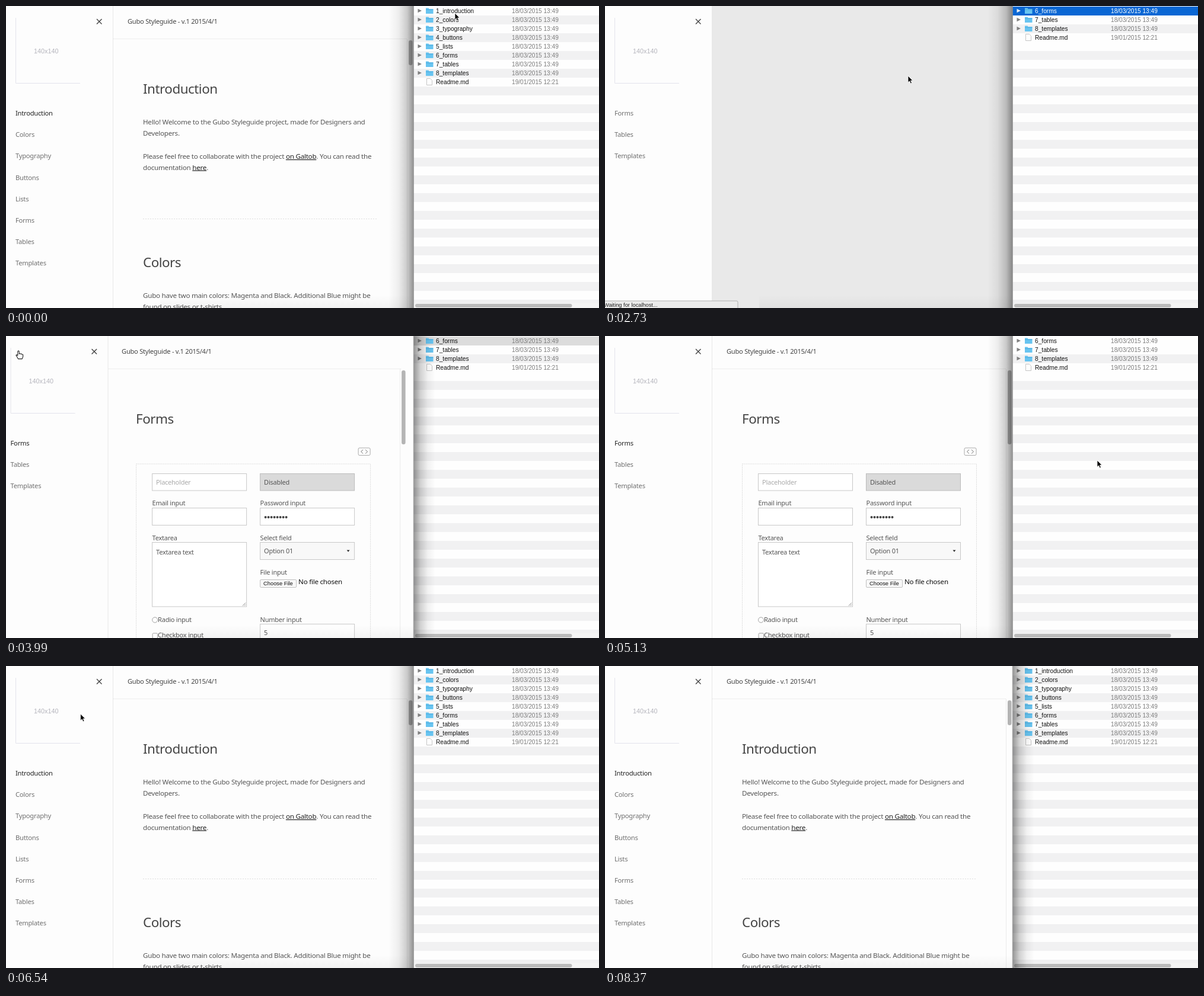
Recreate the animation shown at these times as an HTML page. Size 1000x510 px, loop 8.4 s.

```html
<!DOCTYPE html>
<html lang="en">
<head>
<meta charset="utf-8">
<title>Styleguide preview</title>
<style>
html, body { margin: 0; width: 100%; height: 100%; overflow: hidden; background: #fdfdfd; }
svg { display: block; width: 100vw; height: 100vh; }
text { font-family: "Noto Sans", sans-serif; letter-spacing: -.022em; white-space: pre; }
.ui { font-family: "Liberation Sans", Arial, sans-serif; letter-spacing: 0; }
.link { text-decoration: underline; fill: #222; }
</style>
</head>
<body>
<svg viewBox="0 0 1000 510" preserveAspectRatio="none">
  <defs>
    <linearGradient id="shadeL">
      <stop offset="0" stop-opacity="0"/>
      <stop offset=".4" stop-opacity=".06"/>
      <stop offset=".75" stop-opacity=".2"/>
      <stop offset="1" stop-opacity=".42"/>
    </linearGradient>
    <linearGradient id="shadeR">
      <stop offset="0" stop-opacity=".4"/>
      <stop offset=".3" stop-opacity=".18"/>
      <stop offset=".65" stop-opacity=".05"/>
      <stop offset="1" stop-opacity="0"/>
    </linearGradient>
    <linearGradient id="shadeB" x2="0" y2="1">
      <stop offset="0" stop-opacity="0"/>
      <stop offset="1" stop-opacity=".04"/>
    </linearGradient>
    <clipPath id="left"><rect width="687" height="510"/></clipPath>
  </defs>
  <g clip-path="url(#left)">
    <rect width="687" height="510" fill="#fdfdfd"/>
    <g id="main"><g id="intro"></g><g id="forms"></g></g>
    <g id="bar"></g>
    <rect id="blank" width="687" height="510" fill="#e9e9e9"/>
    <g id="head"></g>
    <g id="rawHead"></g>
    <g id="side"></g>
    <g id="burger">
      <rect width="42" height="37" fill="#fdfdfd"/>
      <path d="M12 14.5h12M12 18.5h12M12 22.5h12" stroke="#777"/>
    </g>
    <rect x="260" y="488" width="427" height="22" fill="url(#shadeB)"/>
    <rect id="shadowL" x="645" width="42" height="510" fill="url(#shadeL)"/>
    <g id="wait"></g>
  </g>
  <g id="finder"></g>
  <rect id="shadowR" x="688" width="36" height="510" fill="url(#shadeR)"/>
  <path d="M687.3 0v510" stroke="#909090"/>
  <g id="cursor">
    <path id="arrow" d="M0 0V11.2L2.6 8.8 4.4 13 6.4 12.1 4.6 8H8Z" fill="#000" stroke="#fff" stroke-width=".8"/>
    <path id="hand" d="M-1.2 1Q0-.8 1.2 1V5.2L2 4.6 3.4 5.2 4.8 5 6 6 7.6 6.4V10L6.2 13.6H-.6L-2.2 10.5-4 7.6Q-3.6 6-1.2 8Z" fill="#fff" stroke="#222" stroke-width="1.1" stroke-linejoin="round"/>
  </g>
</svg>
<script>
const LOOP = 8400;
const $ = id => document.getElementById(id);
const show = (id, on) => { $(id).style.display = on ? '' : 'none'; };
const move = (id, x, y = 0) => $(id).setAttribute('transform', `translate(${x} ${y})`);

const text = (x, y, s, size, fill, cls = '') =>
  `<text x="${x}" y="${y}" font-size="${size}" fill="${fill}" class="${cls}">${s}</text>`;
const rect = (x, y, w, h, fill, more = '') =>
  `<rect x="${x}" y="${y}" width="${w}" height="${h}" fill="${fill}" ${more}/>`;
const path = (d, stroke, more = '') => `<path d="${d}" fill="none" stroke="${stroke}" ${more}/>`;

const PAGE = '#fdfdfd', INK = '#555', TITLE = '#444', DARK = '#222';
const HEADER = 'Gubo Styleguide - v.1 2015/4/1';
const title = (x, y, s) => text(x, y, s, 22.4, TITLE);
const para = (y, s) => text(231, y, s, 11.65, INK);
const link = s => `<tspan class="link">${s}</tspan>`;

$('intro').innerHTML =
  title(231, 148, 'Introduction') +
  para(200, 'Hello! Welcome to the Gubo Styleguide project, made for Designers and') +
  para(219, 'Developers.') +
  para(258, `Please feel free to collaborate with the project ${link('on Galtob')}. You can read the`) +
  para(276.5, `documentation ${link('here')}.`) +
  path('M231 359.5H626', '#ddd', 'stroke-dasharray="2 2"') +
  title(231, 441, 'Colors') +
  para(493, 'Gubo have two main colors: Magenta and Black. Additional Blue might be') +
  para(511.5, 'found on slides or t-shirts.');

function formPage() {
  const A = 246.5, B = 428.5;
  const label = (x, y, s) => text(x, y, s, 11, INK);
  const field = (x, y, h, fill = '#fff', line = '#c8c8c8') =>
    rect(x, y, 159, h, fill, `stroke="${line}"`);
  const value = (x, y, s, fill = INK) => text(x + 6.5, y, s, 11, fill);
  let dots = '';
  for (let i = 0; i < 8; i++) dots += `<circle cx="${437.5 + i * 5}" cy="306" r="2" fill="${TITLE}"/>`;
  return title(219, 148, 'Forms') +
    rect(594, 189, 20, 12.5, 'none', 'rx="2" stroke="#aaa"') +
    path('M602 192l-3.5 3.3 3.5 3.3M606 192l3.5 3.3-3.5 3.3', '#777') +
    rect(219.5, 216, 395, 330, 'none', 'stroke="#ddd" stroke-dasharray="2 1"') +
    field(A, 232.5, 28.5) + value(A, 251, 'Placeholder', '#aaa') +
    field(B, 232.5, 28.5, '#dadada', '#bbb') + value(B, 251, 'Disabled') +
    label(A, 286, 'Email input') + field(A, 290.5, 29) +
    label(B, 286, 'Password input') + field(B, 290.5, 29) + dots +
    label(A, 345, 'Textarea') + field(A, 348.5, 108.5) + value(A, 369, 'Textarea text') +
    path('M399 455.5l5-5M402 455.5l2-2', '#888') +
    label(B, 345, 'Select field') + field(B, 348.5, 29, '#f8f8f8') + value(B, 367, 'Option 01') +
    '<path d="M574.5 361.5h5l-2.5 3z" fill="#222"/>' +
    label(B, 403, 'File input') +
    rect(B, 411.5, 61, 13, '#f8f8f8', 'rx="1.5" stroke="#c0c0c0"') +
    text(434, 421.3, 'Choose File', 9.3, '#111', 'ui') +
    text(493, 419, 'No file chosen', 11.6, '#111') +
    '<circle cx="251" cy="479.5" r="4.5" fill="#fff" stroke="#a0a0a0"/>' +
    label(256, 482.5, 'Radio input') +
    rect(247, 502, 8.5, 8.5, '#fff', 'rx="1.5" stroke="#a0a0a0"') +
    label(256, 509, 'Checkbox input') +
    label(B, 482.5, 'Number input') + field(B, 486.5, 30) + value(B, 505, '5');
}
$('forms').innerHTML = formPage();
move('forms', 12);

$('head').innerHTML = rect(181, 0, 506, 55, PAGE) +
  path('M181 55.5H676', '#ddd', 'stroke-dasharray="1 1"') +
  text(205, 30, HEADER, 11.1, TITLE);
$('rawHead').innerHTML = rect(0, 0, 687, 56, '#f2f2f2') + text(9, 16.5, HEADER, 12.2, DARK);
$('wait').innerHTML = rect(-2, 498, 226, 14, '#ebebeb', 'rx="2" stroke="#b0b0b0"') +
  text(-2, 508, 'Waiting for localhost...', 9.25, DARK, 'ui');

const NAV = ['Introduction', 'Colors', 'Typography', 'Buttons', 'Lists', 'Forms', 'Tables', 'Templates'];
const FILES = NAV.map((n, i) => `${i + 1}_${n.toLowerCase()}`).concat('Readme.md');
const GONE = 5;

function sidebar(few, active) {
  return rect(0, 0, 181, 510, PAGE) +
    path('M180.5 0V510', '#e8e8e8') +
    path('M16.5 20V130.5H125', '#e4e4ec') +
    text(47, 80, '140x140', 10.8, '#b4b4bc', 'ui" letter-spacing=".4') +
    path('M153 22l8.5 8.5M161.5 22l-8.5 8.5', TITLE, 'stroke-width="1.4"') +
    NAV.slice(few ? GONE : 0).map((n, i) =>
      text(16, 185 + i * 36.2, n, 11.2, active && !i ? DARK : '#707070')).join('');
}

function fileRow(name, i, on) {
  const y = 8 + i * 15, file = name === 'Readme.md';
  const icon = file
    ? `<path d="M709.5 ${y - 5.5}h6l3 3v8h-9z" fill="#fff" stroke="#c4c4c4"/>`
    : `<path d="M694.5 ${y - 3.3}v6.6l6.5-3.3z" fill="${on ? '#e5eef8' : '#808080'}"/>` +
      `<path d="M708 ${y + 5}v-9.5h4.5l1 1.5h7v8z" fill="#68c4f0"/>` +
      path(`M708 ${y - 1.8}h12.5`, '#4aa9dc', 'stroke-width=".8"');
  return icon + text(725, y + 3.6, name, 10.2, on ? '#fff' : '#111', 'ui') +
    text(853, y + 3.6, file ? '19/01/2015 12:21' : '18/03/2015 13:49', 10.15,
      on ? '#fff' : '#7c7c7c', 'ui');
}

function finder(few, picked, focus) {
  const files = few ? FILES.slice(GONE) : FILES;
  let out = rect(687, 0, 313, 510, '#fefefe');
  for (let i = 0; i < 34; i++) {
    const stripe = few && i < 4 ? i === 2 : i % 2;
    const fill = i < picked ? (focus ? '#0a67d4' : '#dcdcdc') : stripe ? '#f1f1f2' : '';
    if (fill) out += rect(687, 1 + i * 15, 313, 15, fill);
  }
  out += files.map((f, i) => fileRow(f, i, focus && i < picked)).join('');
  return out + rect(687, 501.5, 313, 8.5, '#f4f4f4') +
    rect(690, 503, 264.5, 6, '#bcbcbc', 'rx="3"');
}

// Pointer stops: time, x, y
const STOPS = [
  [0, 757, 12], [240, 757, 12], [660, 757, 66], [900, 757, 66], [1300, 757, 103],
  [2310, 757, 103], [2730, 511, 118], [3180, 156, 23], [3330, 156, 23], [3660, 21, 25],
  [4080, 21, 25], [4800, 830, 210], [5350, 830, 210], [6060, 113, 80], [6360, 113, 80],
  [7020, 182, 85], [7800, 182, 85], [8130, 340, -30], [8400, 340, -30]
];
function slope(i, k) {
  const a = STOPS[i - 1], b = STOPS[i], c = STOPS[i + 1];
  if (!a || !c) return 0;
  const p = (b[k] - a[k]) / (b[0] - a[0]), q = (c[k] - b[k]) / (c[0] - b[0]);
  return p * q <= 0 ? 0 : 2 * p * q / (p + q);
}
function pointer(t, k) {
  let i = 0;
  while (i < STOPS.length - 2 && t >= STOPS[i + 1][0]) i++;
  const a = STOPS[i], b = STOPS[i + 1], d = b[0] - a[0], u = (t - a[0]) / d, v = 1 - u;
  return a[k] * (1 + 2 * u) * v * v + b[k] * u * u * (3 - 2 * u) +
    d * u * v * (v * slope(i, k) - u * slope(i + 1, k));
}

const CLOSE = 3270, OPEN = 3798;
const clamp = x => Math.max(0, Math.min(1, x));
function slide(t, delay = 0) {
  if (t < CLOSE) return 0;
  const left = (1 - clamp((t - (t < OPEN ? CLOSE : OPEN + delay)) / 300)) ** 3;
  return -181 * (t < OPEN ? 1 - left : left);
}

const between = (t, a, b) => t >= a && t < b;
const last = {};
function fill(id, make, ...args) {
  const key = args.join();
  if (last[id] !== key) {
    last[id] = key;
    $(id).innerHTML = make(...args);
  }
}
const scrollbar = h => path('M676.5 56V510', '#ebebeb') + rect(679, 58, 6.5, h, '#b4b4b4', 'rx="3.2"');

function render(t) {
  const raw = between(t, 2610, 2700) || between(t, 6030, 6120);
  const blank = raw || between(t, 2700, 2880) || between(t, 6120, 6300);
  const fewNav = between(t, 2610, 6030), fewFiles = between(t, 1200, 5300);
  const web = between(t, CLOSE, 4860) || t >= 6700;
  const shut = between(t, CLOSE, OPEN);

  show('intro', !fewNav);
  show('forms', fewNav);
  show('main', !blank);
  show('bar', !blank);
  show('blank', blank);
  show('head', !blank);
  show('rawHead', raw);
  show('side', !raw);
  show('burger', raw || shut);
  show('wait', blank);
  show('shadowL', !web);
  show('shadowR', web);

  const x = slide(t, 13);
  move('main', x);
  move('bar', shut && t > CLOSE + 300 ? 0 : x);
  move('head', slide(t, 6));
  move('side', slide(t));
  fill('bar', scrollbar, fewNav ? 125 : 42);
  fill('side', sidebar, fewNav, !blank);

  const picked = t < 150 ? 0 : t < 780 ? 1 : t < 1200 ? 5 : t < 4860 ? 1 : 0;
  fill('finder', finder, fewFiles, picked, !web);

  const hand = between(t, 3120, 3360) || between(t, 3600, 4140);
  show('hand', hand);
  show('arrow', !hand);
  move('cursor', pointer(t, 1), pointer(t, 2));
}

const start = performance.now();
function tick() {
  const t = (performance.now() - start) % LOOP;
  render(Math.floor(t / 30) * 30);
  requestAnimationFrame(tick);
}
tick();
</script>
</body>
</html>
```
